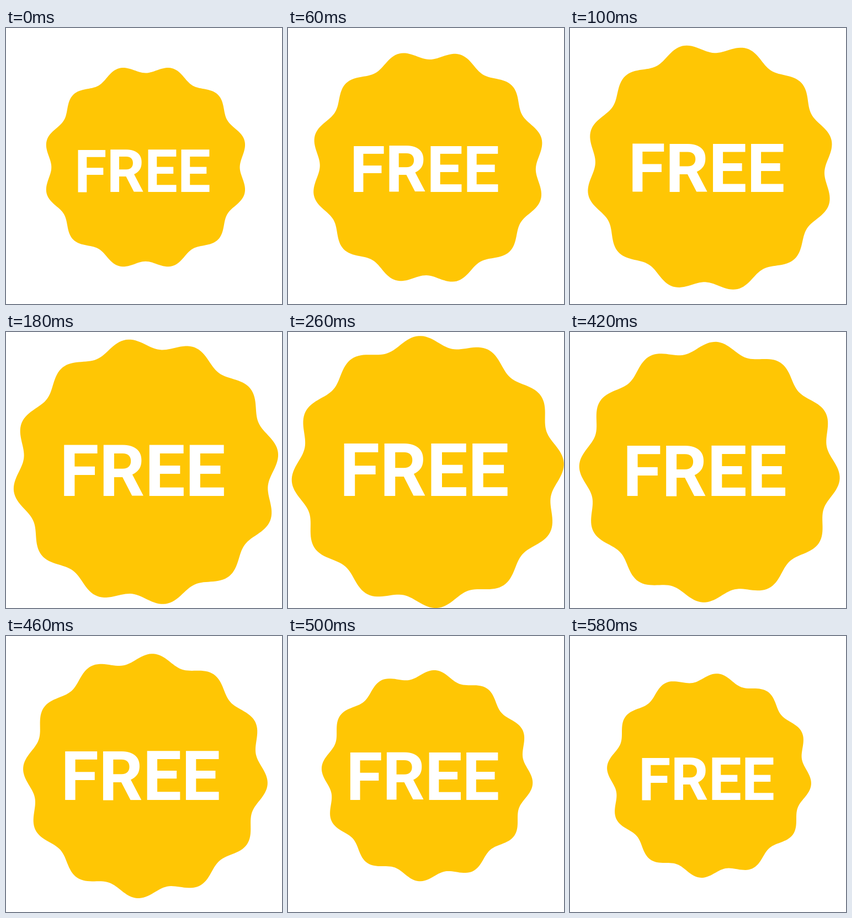
An HTML page for the animation above (600 ms loop, 500 px wide and 500 px high).

```html
<!DOCTYPE html>
<html lang="en">
<head>
<meta charset="utf-8">
<title>Free badge</title>
<style>
  html, body { margin: 0; width: 100%; height: 100%; overflow: hidden; background: #fff; }
  svg { display: block; width: 100vw; height: 100vh; }
  text { font: 700 106.9px Roboto, sans-serif; fill: #fff; text-anchor: middle; }
</style>
</head>
<body>
<svg viewBox="0 0 500 500">
  <path id="badge" fill="#ffc604"/>
  <text id="label">FREE</text>
</svg>
<script>
const LOOP = 600, STEP = 20, END = 580;
const LOBES = 12, RADIUS = 185.5, BASELINE = 297.4;
const badge = document.getElementById('badge');
const label = document.getElementById('label');

// Position of t between two times, held to 0..1
const progress = (t, from, to) => Math.min(Math.max((t - from) / (to - from), 0), 1);

// cubic-bezier(x1, 0, x2, 1)
function ease(x, x1, x2) {
  let lo = 0, hi = 1;
  for (let i = 0; i < 24; i++) {
    const s = (lo + hi) / 2, r = 1 - s;
    if (3 * s * r * r * x1 + 3 * s * s * r * x2 + s * s * s < x) lo = s; else hi = s;
  }
  return lo * lo * (3 - 2 * lo);
}

// Scalloped disc, one lobe pointing up
function scallop(radius) {
  const points = [];
  for (let deg = 0; deg < 360; deg++) {
    const a = deg * Math.PI / 180;
    const r = radius * (0.96 + 0.04 * Math.cos(LOBES * a));
    points.push((r * Math.sin(a)).toFixed(2) + ' ' + (-r * Math.cos(a)).toFixed(2));
  }
  return 'M' + points.join('L') + 'Z';
}

function draw(t) {
  // Badge: fast swell, late drop, one slow turn about the stage centre
  const swell = 1 - (1 - progress(t, 0, 280)) ** 2.4;
  const drop = ease(progress(t, 280, 540), 0.98, 0.62);
  const size = 1 + 0.332 * (swell - drop);
  const angle = -15 + 20 * ease(progress(t, 0, END), 0.29, 0.48);
  badge.setAttribute('transform',
    `translate(250 250) rotate(${angle}) scale(${size}) translate(2.25 2.85)`);

  // Label: symmetric swell with a slight lean to the left on the way back
  const grow = 1 - Math.abs(2 * progress(t, 0, END) - 1) ** 2.2;
  const lean = Math.sin(Math.PI * progress(t, 180, END) ** 2);
  label.setAttribute('transform',
    `translate(${247.4 - 3.5 * lean} ${BASELINE}) scale(${1 + 0.246 * grow})`);
}

badge.setAttribute('d', scallop(RADIUS));
const start = performance.now();
function tick() {
  const t = (performance.now() - start) % LOOP;
  draw(Math.floor(t / STEP) * STEP);
  requestAnimationFrame(tick);
}
draw(0);
requestAnimationFrame(tick);
</script>
</body>
</html>
```
